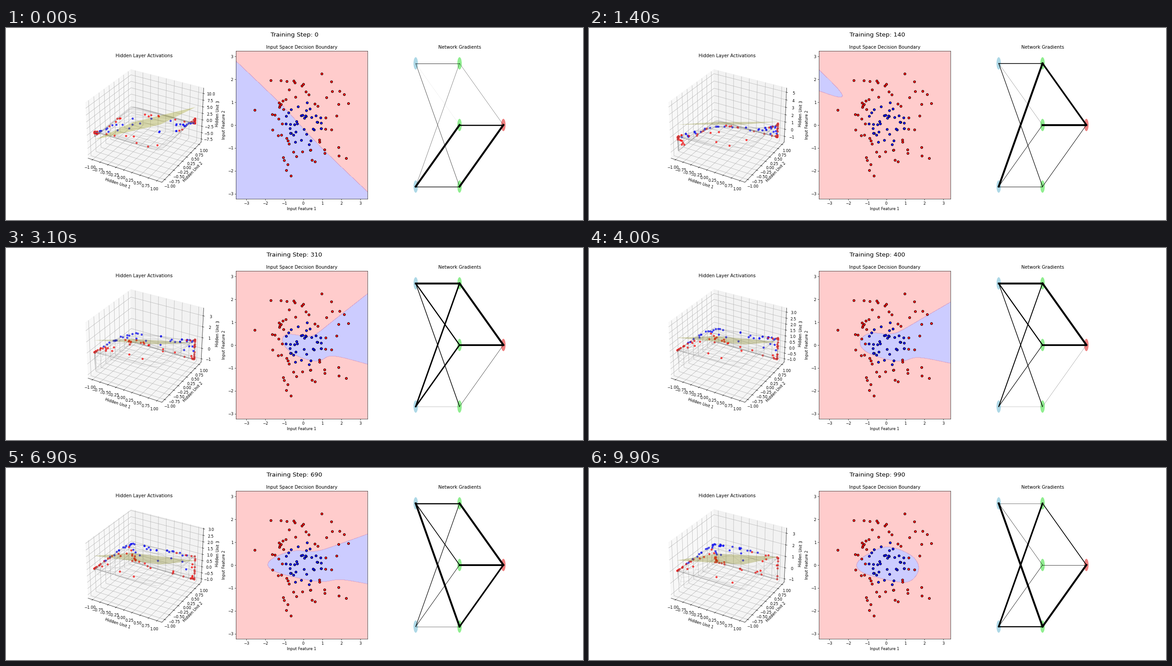
Write a matplotlib script that moves like this. It is 1280x427 px and loops after 10000 ms.

```python
import numpy as np
import matplotlib.pyplot as plt
from matplotlib.animation import FuncAnimation
from matplotlib.patches import Ellipse

DPI = 1280 / 21
FRAMES, STEPS_PER_FRAME, RATE = 100, 10, 0.1


def make_data(count=100):
    np.random.seed(0)
    points = np.random.randn(count, 2)
    labels = (np.sum(points ** 2, axis=1) > 1).astype(float)
    return points, labels[:, None]


class Network:
    """Two inputs, three tanh units, one sigmoid output."""

    def __init__(self):
        np.random.seed(0)
        self.w1 = np.random.randn(2, 3)
        self.b1 = np.zeros((1, 3))
        self.w2 = np.random.randn(3, 1)
        self.b2 = np.zeros((1, 1))

    def hidden(self, x):
        return np.tanh(x @ self.w1 + self.b1)

    def logit(self, x):
        return self.hidden(x) @ self.w2 + self.b2

    def train(self, x, y):
        h = self.hidden(x)
        out = 1 / (1 + np.exp(-(h @ self.w2 + self.b2)))
        d2 = (out - y) / len(x)
        d1 = (d2 @ self.w2.T) * (1 - h ** 2)
        self.g1, self.g2 = x.T @ d1, h.T @ d2
        self.w2 -= RATE * self.g2
        self.b2 -= RATE * d2.sum(axis=0)
        self.w1 -= RATE * self.g1
        self.b1 -= RATE * d1.sum(axis=0)


def grid(count):
    (x0, y0), (x1, y1) = X.min(axis=0) - 1, X.max(axis=0) + 1
    return np.meshgrid(np.linspace(x0, x1, count), np.linspace(y0, y1, count))


def on_grid(func, gx, gy):
    return func(np.c_[gx.ravel(), gy.ravel()])


X, Y = make_data()
FINE, COARSE = grid(100), grid(20)
PLANE = np.meshgrid(np.linspace(-1, 1, 10), np.linspace(-1, 1, 10))


def record():
    """Train once and keep what every frame needs."""
    net, history = Network(), []
    for frame in range(FRAMES):
        # the opening picture already has two rounds behind it
        for _ in range(STEPS_PER_FRAME * (2 if frame == 0 else 1)):
            net.train(X, Y)
        a, b, c = net.w2.ravel()
        history.append(dict(
            points=net.hidden(X),
            mesh=on_grid(net.hidden, *COARSE),
            plane=-(a * PLANE[0] + b * PLANE[1] + net.b2.item()) / c,
            field=on_grid(net.logit, *FINE).reshape(FINE[0].shape),
            grads=(np.abs(net.g1), np.abs(net.g2))))
    return history


HISTORY = record()

fig = plt.figure(figsize=(21, 7.0055), dpi=DPI)
ax_hidden = fig.add_subplot(131, projection="3d")
ax_input = fig.add_subplot(132)
ax_grad = fig.add_subplot(133)
heading = fig.suptitle("", fontsize=16)

# input space
ax_input.set_title("Input Space Decision Boundary")
ax_input.set_xlabel("Input Feature 1")
ax_input.set_ylabel("Input Feature 2")
ax_input.scatter(X[:, 0], X[:, 1], c=Y.ravel(), cmap="bwr", edgecolors="k", zorder=3)
ax_input.set_xlim(FINE[0].min(), FINE[0].max())
ax_input.set_ylim(FINE[1].min(), FINE[1].max())

# network graph
ax_grad.set_title("Network Gradients")
ax_grad.set_xlim(-0.25, 1.25)
ax_grad.set_ylim(-0.1, 1.1)
ax_grad.axis("off")
LAYERS = [[(0, 0), (0, 1)], [(0.5, 0), (0.5, 0.5), (0.5, 1)], [(1, 0.5)]]
for layer, color in zip(LAYERS, ("lightblue", "lightgreen", "lightcoral")):
    for node in layer:
        ax_grad.add_patch(Ellipse(node, 0.05, 0.1, color=color, lw=0))


def connect(left, right):
    return [[ax_grad.plot(*zip(p, q), color="k")[0] for q in right] for p in left]


edges = [connect(LAYERS[0], LAYERS[1]), connect(LAYERS[1], LAYERS[2])]
regions = []


def draw_hidden(state):
    ax = ax_hidden
    ax.clear()
    ax.set_title("Hidden Layer Activations")
    ax.set_xlabel("Hidden Unit 1")
    ax.set_ylabel("Hidden Unit 2")
    ax.set_zlabel("Hidden Unit 3")
    ax.scatter(*state["points"].T, c=Y.ravel(), cmap="bwr", alpha=0.7)
    mesh = [m.reshape(COARSE[0].shape) for m in state["mesh"].T]
    ax.plot_wireframe(*mesh, color="gray", alpha=0.2, linewidth=1)
    ax.plot_surface(*PLANE, state["plane"], color="y", alpha=0.3)


def update(frame):
    state = HISTORY[frame]
    heading.set_text(f"Training Step: {frame * STEPS_PER_FRAME}")
    draw_hidden(state)
    while regions:
        regions.pop().remove()
    regions.append(ax_input.contourf(
        *FINE, state["field"], levels=[-1e6, 0, 1e6], colors=["blue", "red"], alpha=0.2))
    for lines, grads in zip(edges, state["grads"]):
        for row, values in zip(lines, grads / grads.max()):
            for line, value in zip(row, values):
                line.set_linewidth(5 * value)


anim = FuncAnimation(fig, update, frames=FRAMES, interval=100,
                     init_func=lambda: [], repeat=True, repeat_delay=0)
plt.show()
```
